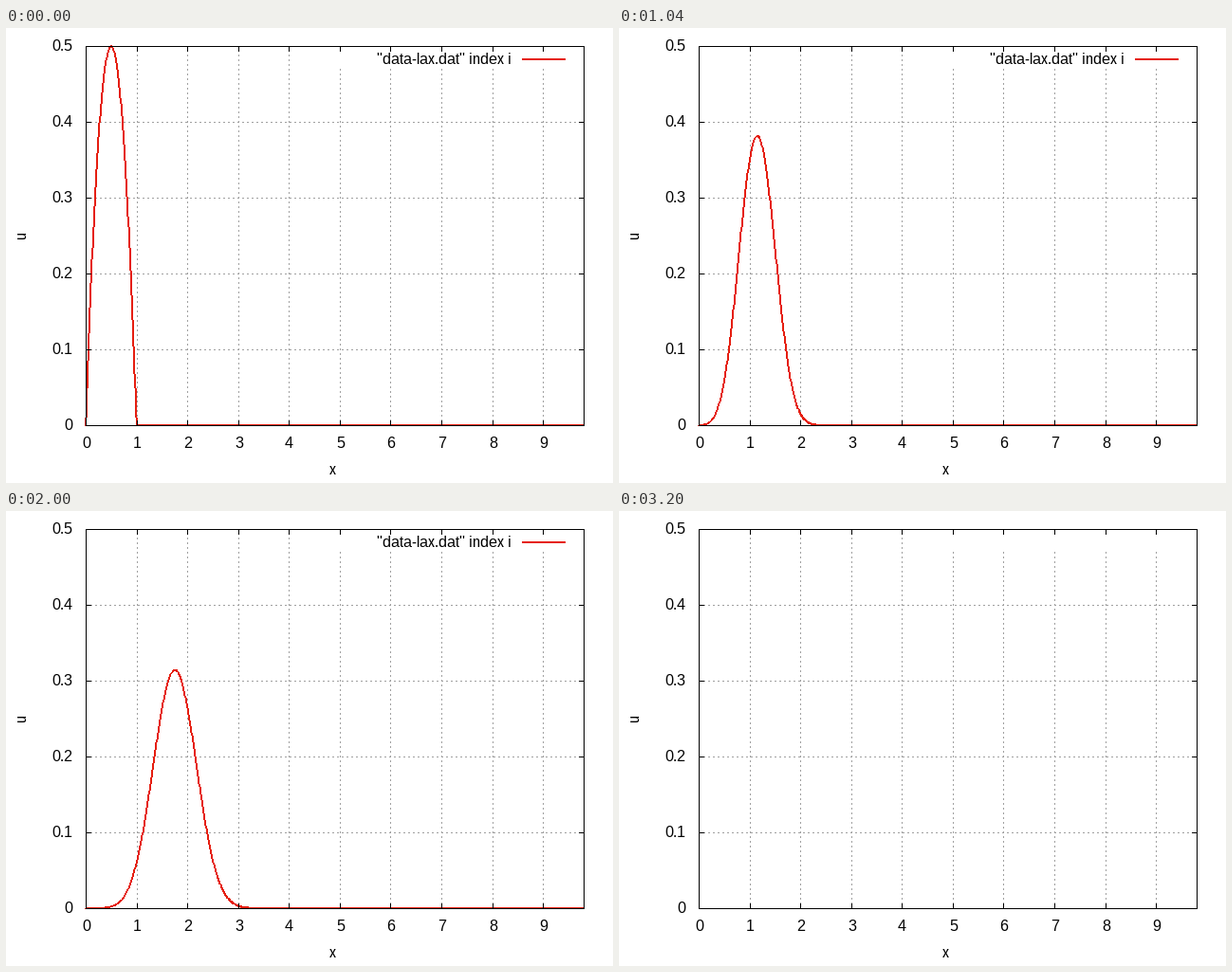
These frames come from a looping animation (640x480 px, 3280 ms). A matplotlib script:

```python
import numpy as np
import matplotlib.pyplot as plt
from matplotlib.animation import FuncAnimation
from matplotlib.collections import LineCollection

W, H, DPI = 640, 480, 100
PX = 72 / DPI                     # one pixel in points
LEFT, RIGHT, TOP, BOTTOM = 84, 609, 19, 419
X_MAX, U_MAX = 9.8, 0.5
RED, GRID = "#e51e10", "#a0a0a0"

FRAMES = 41                       # the last one has no data
STEPS, DX, COURANT = 50, 0.01, 0.1

plt.rcParams.update({
    "font.family": "Liberation Sans",
    "font.size": 16 * PX,
    "text.hinting": "default",
    "text.hinting_factor": 1,
})


def to_px(x, u):
    px = LEFT + x * (RIGHT - LEFT) / X_MAX
    py = BOTTOM - u * (BOTTOM - TOP) / U_MAX
    return np.floor(px + 0.5), np.floor(py + 0.5)


def lax_step(u):
    new = np.zeros_like(u)
    ahead, behind = u[2:], u[:-2]
    new[1:-1] = (ahead + behind) / 2 - COURANT / 2 * (ahead - behind)
    return new


def bars(p, q):
    """Two-pixel bars along a stepped line: level if steep, upright if flat."""
    dx, dy = abs(q[0] - p[0]), abs(q[1] - p[1])
    steep = dx == 0 or dy > dx
    main, side = (1, 0) if steep else (0, 1)
    if p[main] > q[main]:
        p, q = q, p
    n = int(max(dx, dy))
    for k in range(n + 1):
        a = p[main] + k
        shift = np.floor(k * abs(q[side] - p[side]) / max(n, 1) + 0.5)
        b = p[side] + np.sign(q[side] - p[side]) * shift
        if steep:
            yield (b - 1, a + 0.5), (b + 1, a + 0.5)
        else:
            yield (a + 0.5, b - 1), (a + 0.5, b + 1)


def trace(x, u):
    points = list(zip(*to_px(x, u)))
    pairs = zip(points[:1] + points, points)
    return [bar for p, q in pairs for bar in bars(p, q)]


def solve():
    x = np.arange(round(X_MAX / DX) + 1) * DX
    u = np.where(x < 1, 2 * x * (1 - x), 0.0)
    curves = [trace(x, u)]
    for _ in range(FRAMES - 2):
        for _ in range(STEPS):
            u = lax_step(u)
        curves.append(trace(x, u))
    return curves


fig = plt.figure(figsize=(W / DPI, H / DPI), dpi=DPI, facecolor="white")
ax = fig.add_axes([0, 0, 1, 1])
ax.set_xlim(0, W)
ax.set_ylim(H, 0)
ax.axis("off")


def stroke(xs, ys, color="black", width=1, **kw):
    return ax.plot(xs, ys, color=color, lw=width * PX, antialiased=False,
                   snap=False, solid_capstyle="butt", **kw)[0]


def hline(x0, x1, y, **kw):
    stroke([x0, x1 + 1], [y + 0.5] * 2, **kw)


def vline(x, y0, y1, **kw):
    stroke([x + 0.5] * 2, [y0 + 1, y1], **kw)


dotted = dict(color=GRID, linestyle=(0, (2, 3)), dash_capstyle="butt", zorder=1)
front = dict(zorder=4)

for i in range(6):
    _, y = to_px(0, i / 10)
    ax.text(70, y + 5, f"{i / 10:g}", ha="right", va="baseline")
    if 0 < i < 5:
        hline(LEFT, RIGHT, y, **dotted)
        hline(LEFT, LEFT + 5, y, **front)
        hline(RIGHT - 5, RIGHT, y, **front)

for i in range(10):
    x, _ = to_px(i, 0)
    ax.text(x - 4, 443, str(i), ha="left", va="baseline")
    if i > 0:
        vline(x, BOTTOM, 41 if i > 4 else TOP, **dotted)
        vline(x, BOTTOM, BOTTOM - 5, **front)
        vline(x, TOP + 5, TOP, **front)

for y in (TOP, BOTTOM):
    hline(LEFT, RIGHT, y, **front)
for x in (LEFT, RIGHT):
    vline(x, BOTTOM, TOP, **front)

ax.text(344, 471, "x", ha="center", va="baseline")
ax.text(21, 219, "u", ha="center", va="baseline", rotation=90,
        rotation_mode="anchor")

key_text = ax.text(533, 38, '"data-lax.dat" index i', ha="right", va="baseline")
key_line = stroke([544, 590], [33, 33], RED, 2)
curve = LineCollection([], colors=RED, linewidths=PX, antialiaseds=False,
                       capstyle="butt", snap=False, zorder=3)
ax.add_collection(curve, autolim=False)
artists = (curve, key_line, key_text)
curves = solve()


def draw(k):
    shown = k < len(curves)
    for a in artists:
        a.set_visible(shown)
    if shown:
        curve.set_segments(curves[k])
    return artists


anim = FuncAnimation(fig, draw, frames=FRAMES, init_func=lambda: draw(0),
                     interval=80, repeat=True, repeat_delay=0, blit=False)
plt.show()
```
